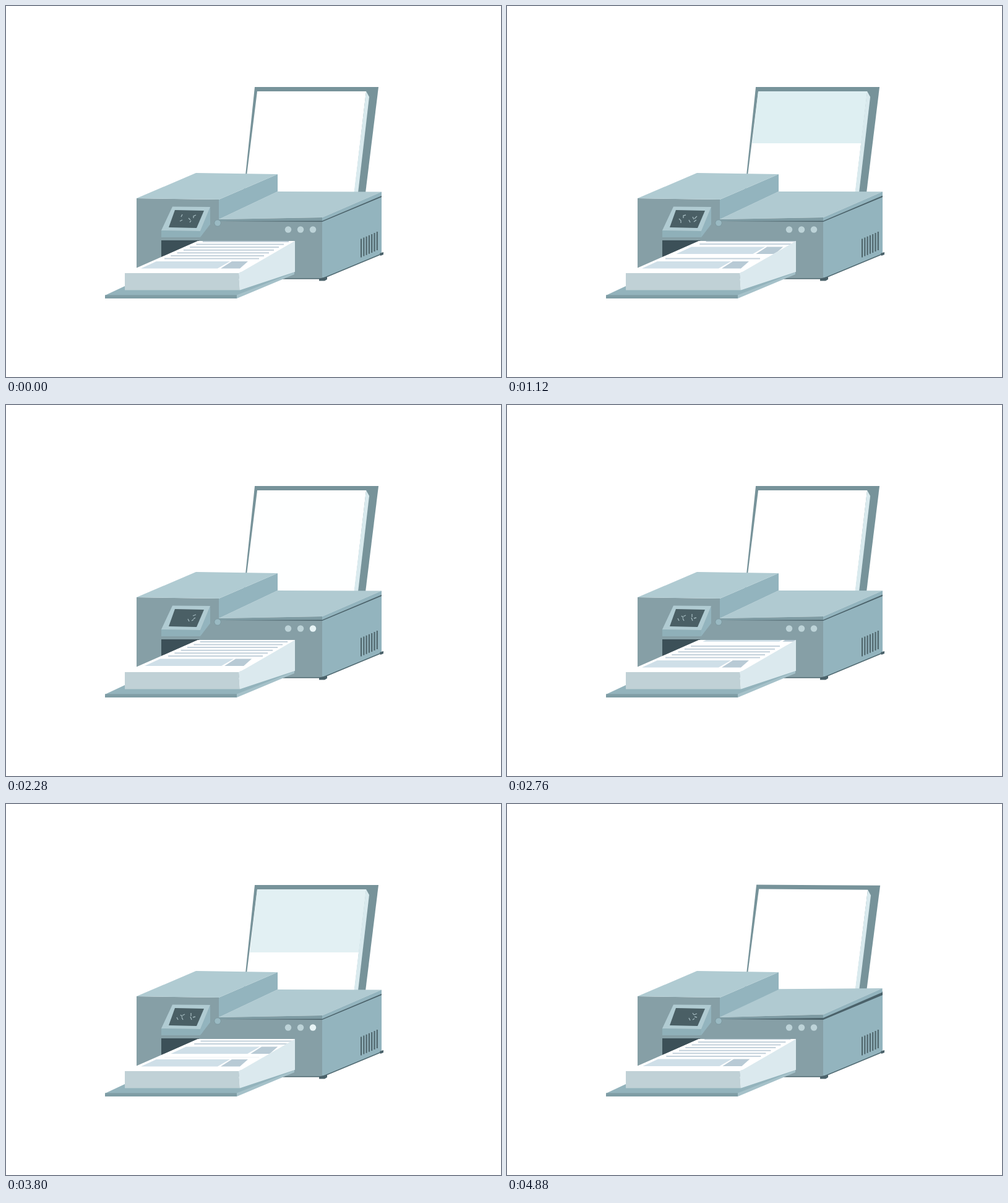
Animation, 800 px wide and 600 px high, one loop 4.92 s. Source, as an HTML page:

```html
<!DOCTYPE html>
<html lang="en">
<head>
<meta charset="utf-8">
<title>Printer</title>
<style>
html, body { margin: 0; width: 100%; height: 100%; overflow: hidden; background: #fff; }
svg { display: block; width: 800px; height: 600px; }
</style>
</head>
<body>
<svg viewBox="0 0 800 600">
  <defs>
    <clipPath id="glass"><path d="M406 138H582L563 301H387Z"/></clipPath>
    <clipPath id="sheet"><path d="M192 432L310 380H467L377 432Z"/></clipPath>
    <g id="print">
      <path fill="#fff" d="M197 430L333 370H490L381 430Z"/>
      <path fill="#cfdfe8" d="M218 424.5L243 413H362L342 424.5Z"/>
      <path fill="#b8cad5" d="M347 424.5L365 413H391L378 424.5Z"/>
      <path class="rows" stroke="#c3d1db" stroke-width="2"/>
    </g>
  </defs>

  <g id="cover">
    <path fill="#77939a" d="M402 131H602L581 302H384Z"/>
    <path fill="#fff" d="M406 138H582L563 302H385.500Z"/>
    <g clip-path="url(#glass)"><rect id="scan" x="380" y="138" width="210" fill="#dbedf1"/></g>
    <path fill="#d9eaee" d="M582 138L587 147L569 302H562.500Z"/>
  </g>

  <path fill="#869fa6" d="M211 311L344 313V345L511 348V441H211Z"/>
  <path fill="#fff" d="M192 432L211 423V445H192Z"/>
  <path fill="#93b4be" d="M511 348L607 307V401L511 441Z"/>
  <path fill="#4b626a" d="M344 346L511 343L607 303V309L511 349L344 348Z"/>
  <g id="lid">
    <path fill="#b0cad1" d="M344 345L439 300L607 300.500L511 342Z"/>
    <path fill="#7e9ba3" d="M344 345L511 342V347.500L344 348Z"/>
    <path fill="#93b4be" d="M511 342L607 300.500V307L511 347.500Z"/>
  </g>
  <path fill="#93b4be" d="M344 313L439 272V300L344 345Z"/>
  <path fill="#b0cbd2" d="M211 311L307 270L439 272L344 313Z"/>

  <path fill="none" stroke="#506a72" stroke-width="1.600" d="M440 441H511L607 401"/>
  <path fill="#4b626a" d="M506 441L511 439.500L519 438V442L515 444.500H506ZM604 400L610 398V402L605 404Z"/>
  <path id="vents" stroke="#4d6268" stroke-width="2"/>
  <g fill="#bdd3d8">
    <circle cx="456" cy="361.500" r="5.200"/>
    <circle cx="476" cy="361.500" r="5.200"/>
    <circle id="lamp" cx="496" cy="361.500" r="5.200"/>
  </g>
  <circle cx="342" cy="351" r="5.500" fill="#78959d"/>
  <circle cx="342" cy="351" r="4.800" fill="#9abac3"/>

  <path fill="#93b4be" d="M330 325V353L314 374V364Z"/>
  <path fill="#8fb0b9" d="M251 363L314 364V374H251Z"/>
  <path fill="#b0cbd2" d="M269 324.500L330 325L314 364L251 363Z"/>
  <path fill="#4a5f65" d="M273 330L320 331L308 359L263 358Z"/>
  <path id="digits" fill="none" stroke="#a3b9be" stroke-width="1.300"/>

  <path fill="#3c5058" d="M251 379H313L251 407Z"/>
  <path fill="#93b3bc" d="M160 468L192 453V459L378 459L466 429V433L373 468Z"/>
  <path fill="#7f9da5" d="M160 467.500H373V473H160Z"/>
  <path fill="#a5c1c9" d="M373 467.500L466 430.500V434L373 473Z"/>
  <path fill="#fff" d="M192 432L310 380H467L377 432Z"/>
  <path fill="#c0d1d6" d="M192 432H376L378 459.500H192Z"/>
  <path fill="#dbe9ee" d="M376 432L467 380V430L378 459.500Z"/>
  <g clip-path="url(#sheet)">
    <use href="#print"/>
    <use href="#print" id="fresh"/>
  </g>
</svg>
<script>
const LOOP = 4920, CYCLE = LOOP / 2, STEP = 40;
const el = id => document.getElementById(id);
const clamp = x => Math.min(1, Math.max(0, x));
const repeat = (n, f) => Array.from({ length: n }, (_, i) => f(i)).join('');

document.querySelector('.rows').setAttribute('d',
  repeat(8, i => `M${256 + 10.3 * i} ${408.5 - 4.6 * i}H${409 + 8 * i}`));
el('vents').setAttribute('d',
  repeat(7, i => `M${574 + 4.3 * i} ${376.5 - 1.9 * i}V${406.5 - 1.9 * i}`));

// Paper feed: [time, distance left to travel]
const feed = [[0, 52], [680, 28.7], [780, 28.2], [1340, 20.5], [1560, 13], [2280, 2.6], [CYCLE, 0]];

const left = 'M276 345l2 4M282 341l3 3M285 342l4-2M284 345l2 4';
const right = 'M299 338v5M302 345l4-1M298 344l2 5';
const swirl = 'M294 346l2 4M300 349l3-2M302 341l5-2';
const displays = [
  [0, 'M283 341l2-4M281 348l4-2M295 343l3 3M297 350l2-3M303 343v-3l4-2'],
  [340, right],
  [1120, 'M278 344l3 3v4M285 343v-4l4-1M294 346l2 4M300 341l2 4M303 344l4-4M302 349l4-3'],
  [1920, swirl + 'M303 346l3-2'],
  [2760, left + right],
  [4340, swirl + 'M300 338l2 3M303 344l4 1']
];

function feedLeft(t) {
  const i = feed.findIndex(([time]) => time > t);
  const [t0, a] = feed[i - 1], [t1, b] = feed[i];
  return a + (b - a) * (t - t0) / (t1 - t0);
}

function draw(now) {
  const t = Math.floor(now % LOOP / STEP) * STEP;
  const c = t % CYCLE;

  const u = clamp((c - 300) / 2000);
  el('scan').setAttribute('height', 164 * u * (1.5 - 0.5 * u) * 0.965);
  el('scan').setAttribute('opacity', 1 - u ** 2.5);

  const d = feedLeft(c);
  el('fresh').setAttribute('transform', `translate(${2.35 * d} ${-d})`);

  const rattle = 2.4 * Math.sin(Math.PI * (t - 10) / 102.5) ** 4;
  el('lid').setAttribute('transform', `rotate(${-rattle * 0.218} 344 346)`);
  el('cover').setAttribute('transform', `rotate(${rattle * 0.16} 480 301)`);

  const blink = t % 820;
  el('lamp').setAttribute('fill', blink >= 400 && blink < 760 ? '#e8f4f6' : '#bdd3d8');
  el('digits').setAttribute('d', displays.findLast(([time]) => time <= t)[1]);
}

const start = performance.now();
function tick() {
  draw(performance.now() - start);
  requestAnimationFrame(tick);
}
tick();
</script>
</body>
</html>
```
